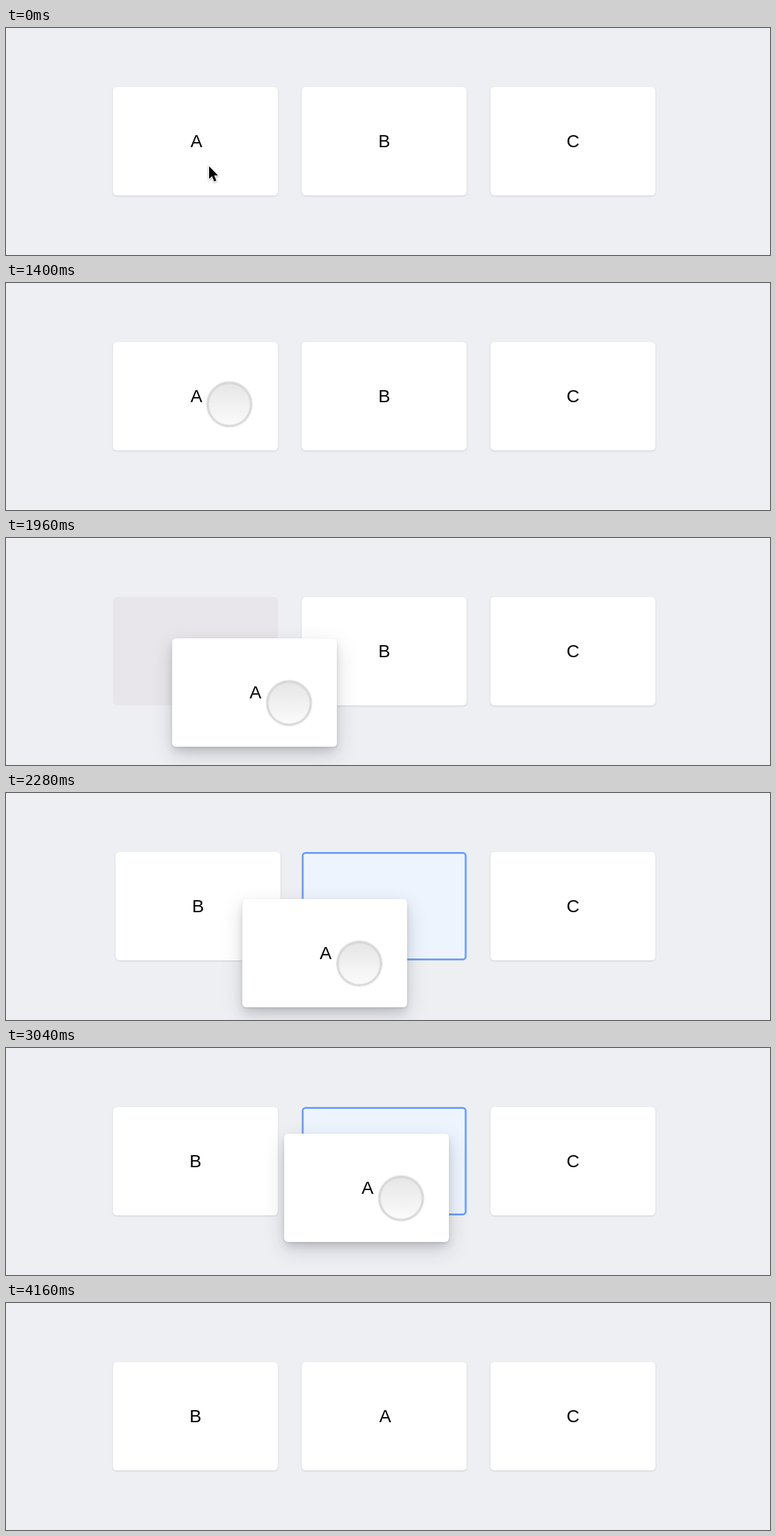
Animation, 1200 px wide and 358 px high, one loop 4960 ms. Source, as an HTML page:

```html
<!DOCTYPE html>
<html lang="en">
<head>
<meta charset="utf-8">
<title>Swapping cards</title>
<style>
  html, body { margin: 0; width: 100%; height: 100%; overflow: hidden; background: #eeeff3; }
  #stage { position: relative; width: 1200px; height: 358px; overflow: hidden; }
  #stage > * { position: absolute; left: 0; top: 0; box-sizing: border-box; }

  .card, #slot { width: 259px; height: 171px; border-radius: 6px; }
  .card {
    --lift: 0;
    background: #fff;
    color: #000;
    font: 28px/172px "Liberation Sans", Arial, sans-serif;
    text-align: center;
    box-shadow:
      0 1px 3px rgba(40, 40, 50, .16),
      0 12px 32px rgba(40, 40, 50, calc(var(--lift) * .17)),
      0 8px 14px -2px rgba(40, 40, 50, calc(var(--lift) * .14));
  }
  #a { text-indent: 3px; }

  #slot { background: #e8e6ea; }
  #slot.over { background: #edf4fe; border: 3px solid #6c9ff8; }

  #touch {
    width: 68px; height: 68px; margin: -34px 0 0 -34px;
    border-radius: 50%;
    background: linear-gradient(#e6e6e6, #fbfbfb);
    border: 1px solid #cfcfcf;
    box-shadow: 0 0 2px 2px rgba(150, 150, 150, .42), inset 0 0 2px rgba(120, 120, 120, .35);
  }
  #arrow { overflow: visible; filter: drop-shadow(0 1.5px 1.5px rgba(0, 0, 0, .35)); }
</style>
</head>
<body>
<div id="stage">
  <div id="slot"></div>
  <div class="card" id="c">C</div>
  <div class="card" id="b">B</div>
  <div class="card" id="a">A</div>
  <div id="touch"></div>
  <svg id="arrow" width="18" height="28">
    <path d="M0 0V20L4.6 15.8L8 24L11.4 22.6L8 14.6H14Z"
          fill="#000" stroke="#fff" stroke-width="2.4" stroke-linejoin="round" paint-order="stroke"/>
  </svg>
</div>
<script>
  const LOOP = 4960, STEP = 40;
  const PRESS = 1080, LIFT = 1440, SWAP = 2040, DROP = 3320, SETTLED = 3600, RELEASE = 4040, GONE = 4160;
  const TOP = 93, LEFT = 168, PITCH = 296.5;
  const GRAB = { x: 351.8, y: 195 };

  const $ = id => document.getElementById(id);
  const mix = (a, b, k) => a + (b - a) * k;
  const smooth = (t, from, to) => {
    const k = Math.min(1, Math.max(0, (t - from) / (to - from)));
    return k * k * (3 - 2 * k);
  };
  const sigmoid = (t, middle, scale) => 1 / (1 + Math.exp((middle - t) / scale));
  const column = n => LEFT + n * PITCH;
  const place = (id, x, y) => { $(id).style.transform = `translate(${x}px, ${y}px)`; };
  const show = (id, on) => { $(id).style.visibility = on ? 'visible' : 'hidden'; };

  // The drag sweeps right while it dips and then rises a little.
  function touchAt(t) {
    const begin = smooth(t, 1360, 1640);
    return {
      x: 350.5 + 271.5 * begin * sigmoid(t, 2076, 183),
      y: 190.5 + 84 * begin * sigmoid(t, 1670, 180) - 38 * sigmoid(t, 2560, 110)
    };
  }

  function arrowAt(t) {
    if (t >= RELEASE) {
      const k = ((t - RELEASE + STEP) / (GONE - RELEASE)) ** 2;
      return { x: mix(622, 898, k), y: mix(236, 4, k) };
    }
    return {
      x: 319 + 8 * smooth(t, 0, 120) + 23.5 * smooth(t, 440, 750),
      y: 218 - 25 * smooth(t, 460, 870)
    };
  }

  function draw(t) {
    const touch = touchAt(t), arrow = arrowAt(t);
    const held = t >= LIFT, swapped = t >= SWAP;
    const home = smooth(t, DROP, SETTLED);

    place('a',
      held ? mix(column(0) + touch.x - GRAB.x, column(1), home) : column(0),
      held ? mix(TOP + touch.y - GRAB.y, TOP, home) : TOP);
    $('a').style.setProperty('--lift', smooth(t, LIFT - STEP, LIFT + 260) * (1 - home));

    place('b', mix(column(1), column(0), smooth(t, SWAP, SWAP + 258)), TOP);
    place('c', column(2), TOP);

    place('slot', column(swapped ? 1 : 0), TOP);
    $('slot').className = swapped ? 'over' : '';
    show('slot', held && t < SETTLED);

    place('touch', touch.x, touch.y);
    $('touch').style.opacity = t < PRESS + STEP ? .5 : 1;
    show('touch', t >= PRESS && t < RELEASE);

    place('arrow', arrow.x, arrow.y);
    show('arrow', t < PRESS || (t >= RELEASE && t < GONE));
  }

  const start = performance.now();
  function tick() {
    const t = (performance.now() - start) % LOOP;
    draw(Math.floor(t / STEP) * STEP);
    requestAnimationFrame(tick);
  }
  tick();
</script>
</body>
</html>
```
